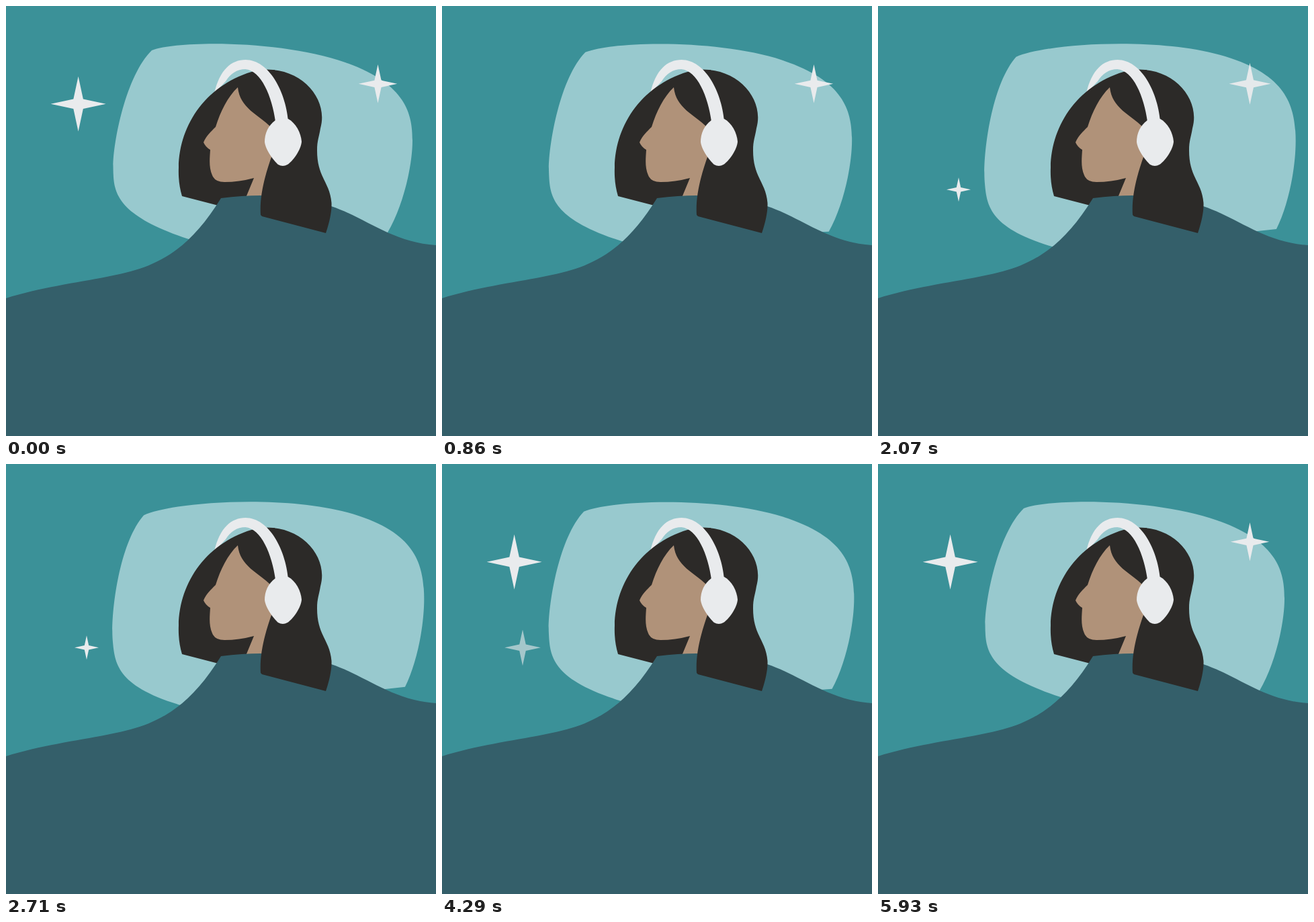
Write an HTML page that moves like this. It is 640 by 640 pixels and loops after 6 s.

```html
<!DOCTYPE html>
<html lang="en">
<head>
<meta charset="utf-8">
<title>Sleeping with headphones</title>
<style>
  html, body { margin: 0; height: 100%; overflow: hidden; background: #3b9198; }
  svg { display: block; width: 100vw; height: 100vh; }
  .white { fill: #e9ebed; }
  .hair { fill: #2c2a28; }
</style>
</head>
<body>
<svg viewBox="0 0 640 640">
  <path id="pillow" fill="#98c9ce" d="M217 66C262 50 415 52 505 84S605 160 605 200S590 300 568 337L272 347C160 310 160 275 159.500 240S178 104 217 66Z"/>
  <path class="white" d="M310 130C318 95 335 80 357 80V94C343 94 334 101 327 112Z"/>
  <path class="hair" d="M372 96C300 115 258 175 257 240Q256 263 262 283L316 297H400V95Z"/>
  <path fill="#b09279" d="M345 121C330 135 319 157 312 180C305 187 298 193 294 203Q297 210 304 214C303 230 302 240 307 252Q311 262 325 262Q347 262 369 256L357 285L379 290L400 230V170Z"/>
  <path fill="#345f6a" d="M0 435C50 419 105 412 150 403C216 391 267 372 320 286Q352 282 379 282L484 298C535 315 575 352 640 356V640H0Z"/>
  <path class="hair" d="M345 121C348 152 376 162 394 180L396 222C386 250 377 282 379 311L381 313L476 338C482 320 485 305 484.500 293C482 262 463 255 463 215C463 200 466 195 468 182C480 140 443 95 389 94.500Q368 95 345 121Z"/>
  <path class="white" d="M356 80C392 80 416 128 420 170L401 172C396 135 380 96 356 94Z"/>
  <path class="white" d="M401 170C390 178 385 190 385 202C386 214 399 231 405 236Q412 240 419 236C427 231 439 214 440 202C439 188 431 174 420 168Z"/>
  <g id="stars" class="white"></g>
</svg>
<script>
const LOOP = 6000, POP = 720;
const $ = id => document.getElementById(id);
const clamp = x => Math.min(1, Math.max(0, x));
const smooth = x => (x = clamp(x), x * x * (3 - 2 * x));

// Each star pops in at "enter" and pops out at "leave"
const stars = [
  { x: 107.6, y: 145.8, r: 41, enter: 2910, leave: 0 },
  { x: 120, y: 273.3, r: 18, enter: 1210, leave: 3955 },
  { x: 553.5, y: 115.8, r: 28.7, enter: 4700, leave: 1980 }
];
for (const s of stars) {
  s.el = document.createElementNS("http://www.w3.org/2000/svg", "path");
  s.el.setAttribute("d", "M0-1L.177-.177L1 0L.177.177L0 1L-.177.177L-1 0L-.177-.177Z");
  $("stars").append(s.el);
}

// The pillow tilts and swells around a point behind the head
function drawPillow(t) {
  const k = t < 2450 ? smooth(t / 2390) : 1 - smooth((t - 2480) / 3520);
  $("pillow").setAttribute("transform",
    `translate(377 122) rotate(${-4.4 * k}) scale(${1 + 0.05 * k}) translate(-377 -122)`);
}

function drawStar(s, t) {
  const since = from => (t - from + LOOP) % LOOP;
  const inT = since(s.enter), outT = since(s.leave);
  const age = Math.min(inT, outT);
  const swell = smooth(1 - Math.abs(age / (POP / 2) - 1));
  const alpha = inT < outT ? clamp(age / 490) : age < POP ? 1 - smooth(age / 780) : 0;
  s.el.setAttribute("transform", `translate(${s.x} ${s.y}) scale(${s.r * (1 + swell / 2)})`);
  s.el.setAttribute("opacity", alpha);
}

const start = performance.now();
function frame() {
  const t = (performance.now() - start) % LOOP;
  drawPillow(t);
  stars.forEach(s => drawStar(s, t));
  requestAnimationFrame(frame);
}
frame();
</script>
</body>
</html>
```
